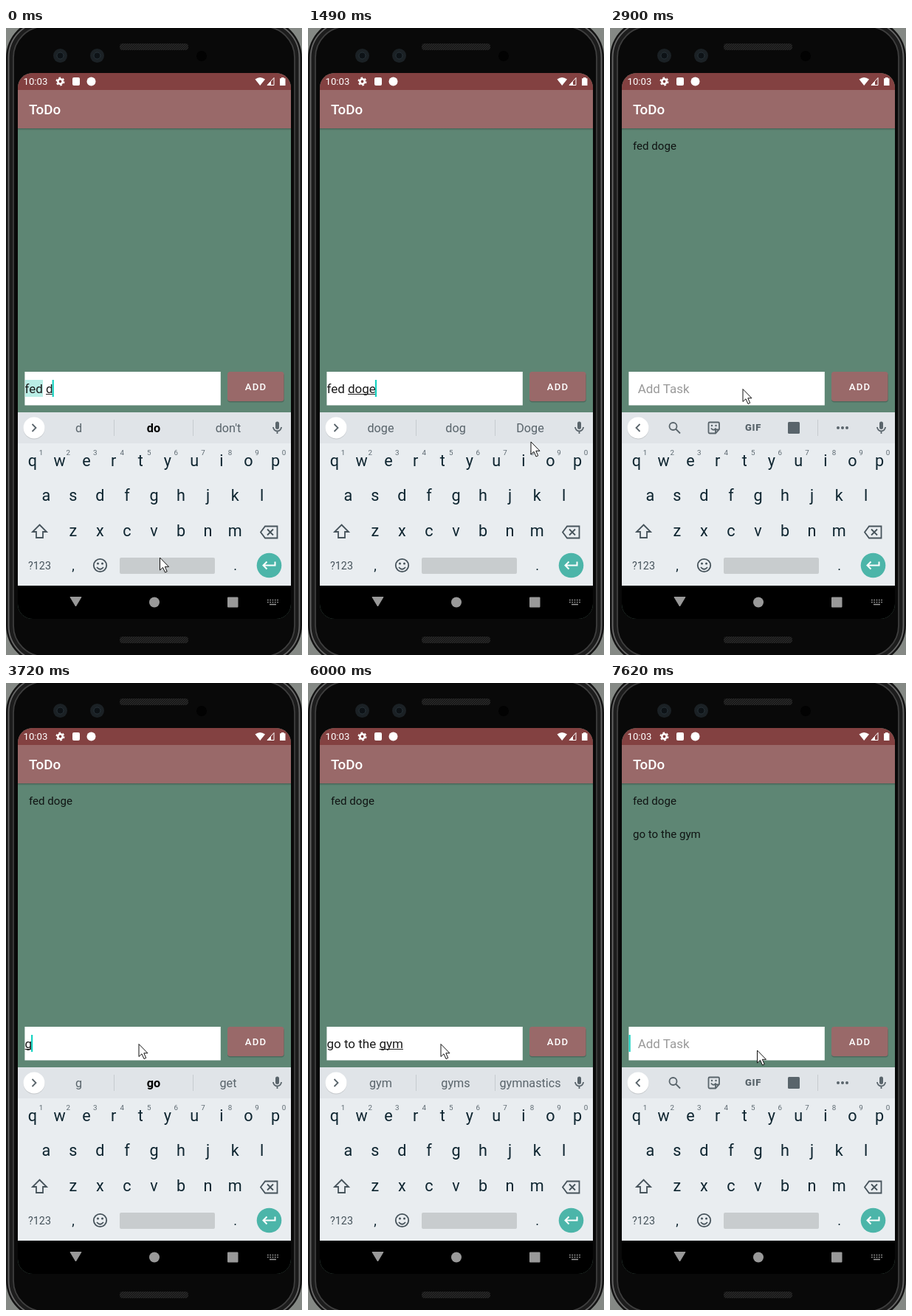
An HTML page that plays this animation: 401 px wide and 850 px high, repeating every 8 s.

```html
<!DOCTYPE html>
<html lang="en">
<head>
<meta charset="utf-8">
<title>ToDo</title>
<style>
html, body { margin: 0; width: 100%; height: 100%; overflow: hidden; background: #858985; }
svg { display: block; width: 100vw; height: 100vh; }
text { font-family: Roboto, sans-serif; white-space: pre; }
.mid { text-anchor: middle; }
.key { font-size: 21.6px; fill: #0e2530; }
.num { font-size: 9.8px; fill: #5c6870; }
.field { font-size: 17px; }
.item { font-size: 15.1px; fill: #101413; }
.hint { font-size: 16.2px; fill: #59646b; }
.line { fill: none; stroke: #59646b; stroke-width: 1.8; }
</style>
</head>
<body>
<svg viewBox="0 0 401 850">
  <defs>
    <clipPath id="screen"><rect x="16" y="61" width="370" height="740" rx="20"/></clipPath>
    <pattern id="mesh" width="3" height="3" patternUnits="userSpaceOnUse">
      <rect width="3" height="3" fill="#171717"/><path d="M0 3L3 0" stroke="#303030"/>
    </pattern>
    <linearGradient id="shade" x2="0" y2="1">
      <stop stop-color="#000" stop-opacity=".25"/><stop offset="1" stop-color="#000" stop-opacity="0"/>
    </linearGradient>
  </defs>

  <!-- phone body -->
  <rect x="0" y="-12" width="401" height="874" rx="52" fill="#141414"/>
  <rect x="3.500" y="-8.500" width="394" height="867" rx="48.500" fill="#1c1c1c" stroke="#666" stroke-width="1.800"/>
  <rect x="10" y="-2" width="381" height="854" rx="42" fill="#090909" stroke="#3e3e3e" stroke-width="1.800"/>
  <rect x="154" y="21" width="93" height="9" rx="4" fill="url(#mesh)"/>
  <rect x="154" y="825" width="93" height="9" rx="4" fill="url(#mesh)"/>
  <g fill="#1b2125"><circle cx="73.500" cy="37.500" r="9.500"/><circle cx="123.500" cy="37.500" r="9.500"/></g>
  <g fill="#0d1216" stroke="#28333a"><circle cx="73.500" cy="37.500" r="4.500"/><circle cx="123.500" cy="37.500" r="4.500"/></g>
  <circle cx="265" cy="38" r="7" fill="#020202"/>

  <g clip-path="url(#screen)">
    <rect x="16" y="61" width="370" height="740" fill="#5e8674"/>
    <rect x="16" y="61" width="370" height="23" fill="#834141"/>
    <rect x="16" y="84" width="370" height="52" fill="#996969"/>
    <rect x="16" y="136" width="370" height="3" fill="url(#shade)"/>
    <g fill="#fff">
      <text x="23.500" y="77" font-size="13.200">10:03</text>
      <text x="31" y="117" font-size="18.800" font-weight="500">ToDo</text>
      <circle cx="73.500" cy="72.500" r="3.200" fill="none" stroke="#fff" stroke-width="2.600"/>
      <circle cx="73.500" cy="72.500" r="5.200" fill="none" stroke="#fff" stroke-width="1.600" stroke-dasharray="2.700 2.745"/>
      <rect x="90" y="67" width="10" height="11" rx="2"/>
      <circle cx="115.500" cy="72.500" r="6"/>
      <path d="M337.500 69.500Q344 64.500 351 69.500L344.200 78Z"/>
      <path d="M363 67.500V77.500H354Z" fill="none" stroke="#fff"/>
      <path d="M359 72V77.500H354Z"/>
      <path d="M371 68.200h2V67h3.500v1.200h2V78h-7.500z"/>
    </g>
    <text id="item1" class="item" x="31" y="165">fed doge</text>
    <text id="item2" class="item" x="31" y="210">go to the gym</text>

    <!-- input row -->
    <rect x="25.400" y="466" width="265.400" height="45.500" fill="#fff"/>
    <rect id="mark" x="26" y="477" width="24" height="23" fill="#b9eee6"/>
    <text id="typed" class="field" x="25.500" y="495" fill="#1b1b1b"></text>
    <text id="empty" class="field" x="37.700" y="495" fill="#999">Add Task</text>
    <rect id="under" y="496" height="1" fill="#222"/>
    <rect id="caret" y="477" width="2.200" height="23" fill="#15d3c1"/>
    <rect x="300" y="467.500" width="77" height="40" rx="4" fill="#000" opacity=".2"/>
    <rect id="button" x="300" y="466" width="76.500" height="40" rx="3.500"/>
    <text x="323.700" y="491" font-size="13.200" font-weight="500" letter-spacing="1.180" fill="#fff">ADD</text>

    <!-- keyboard -->
    <rect x="16" y="521" width="370" height="235" fill="#e9edf0"/>
    <rect x="16" y="521" width="370" height="42" fill="#e0e4e8"/>
    <circle cx="38" cy="543" r="14.500" fill="#000" opacity=".12"/>
    <circle cx="38" cy="542" r="14.500" fill="#fff"/>
    <path id="chevron" class="line"/>
    <g id="words">
      <path d="M146.500 531V553M253.500 531V553" stroke="#c6cbcf"/>
      <text class="hint mid" x="98.500" y="548"></text>
      <text class="hint mid" x="200" y="548"></text>
      <text class="hint mid" x="301" y="548"></text>
    </g>
    <g id="tools" fill="#59646b">
      <circle cx="85.500" cy="540" r="5" class="line"/>
      <path d="M89 543.500L95 549.500" class="line"/>
      <path d="M135 534.500H146.500Q148 534.500 148 536V544L143 549.500H135Q133.500 549.500 133.500 548V536Q133.500 534.500 135 534.500ZM143 549V544.500H148M137 542.500Q140 547 143.500 542.500" class="line"/>
      <circle cx="138" cy="539" r="1.200"/><circle cx="143.500" cy="539" r="1.200"/>
      <text class="mid" x="194" y="546" font-size="13" font-weight="900" letter-spacing=".7">GIF</text>
      <rect x="241" y="534" width="16" height="16" rx="1.500"/>
      <path d="M281.500 531V553" stroke="#c6cbcf"/>
      <circle cx="309" cy="542" r="2"/><circle cx="315" cy="542" r="2"/><circle cx="321" cy="542" r="2"/>
    </g>
    <rect x="365" y="533.500" width="5" height="10.500" rx="2.500" fill="#59646b"/>
    <path d="M362 541a5.500 5.500 0 0 0 11 0M367.500 546.500V550" class="line"/>
    <g id="keys"></g>
    <g class="line" style="stroke: #46535b">
      <path d="M45.500 673.500L55 683H50V691H41V683H36Z"/>
      <path d="M351 675.500H367.500V691.500H351L345 683.500ZM354 679.500L362 687.500M362 679.500L354 687.500"/>
      <circle cx="127.500" cy="728.500" r="8.700"/>
      <path d="M123 731Q127.500 736.500 132 731"/>
    </g>
    <g fill="#46535b"><circle cx="124.500" cy="726" r="1.500"/><circle cx="130.500" cy="726" r="1.500"/></g>
    <text class="mid" x="45.500" y="734" font-size="14.300" fill="#46535b">?123</text>
    <g font-size="18" fill="#0e2530">
      <text class="mid" x="91" y="735">,</text>
      <text class="mid" x="310.500" y="735">.</text>
    </g>
    <rect x="154" y="718" width="129" height="22" rx="2" fill="#c8ccce"/>
    <circle cx="356.500" cy="728.500" r="16.800" fill="#4cb5a9"/>
    <path d="M364.500 723.500V728.500H349M353.500 723.500L348.500 728.500L353.500 733.500" fill="none" stroke="#fff" stroke-width="2"/>

    <!-- navigation bar -->
    <rect x="16" y="756" width="370" height="45"/>
    <g fill="#999">
      <path d="M87 771.500H102L94.500 784Z" stroke="#999" stroke-linejoin="round"/>
      <circle cx="201" cy="778.500" r="7"/>
      <rect x="300" y="771.500" width="14.500" height="14" rx="1"/>
      <path d="M354 775.500H369M354 778.500H369" stroke="#999" stroke-width="1.500" stroke-dasharray="1.700 1.600"/>
      <path d="M357 781.500H366" stroke="#999" stroke-width="1.500"/>
    </g>
  </g>
  <path id="mouse" d="M0 0V17L4 13.300L7 20L9.700 18.800L6.800 12.300H12Z" fill="#fff" stroke="#111" stroke-linejoin="round"/>
</svg>
<script>
const $ = id => document.getElementById(id);
const LOOP = 8000, LEFT = 25.5;

// time, typed text, suggestions (* marks the bold one)
const typing = [
  [0, 'fed d', 'd,*do,don\'t'],
  [150, 'fed do', 'do,does,doing'],
  [270, 'fed dog', 'dog,does,dogs'],
  [540, 'fed doge', 'doge,dog,Doge'],
  [2120, ''],
  [3600, 'g', 'g,*go,get'],
  [3840, 'go', 'go,going,good'],
  [3960, 'go ', 'to,back,and'],
  [4110, 'go t', 't,*to,the'],
  [4230, 'go to', 'to,too,tomorrow'],
  [4350, 'go to t', 't,*the,to'],
  [4470, 'go to th', 'th,*the,that'],
  [4620, 'go to the', 'the,they,then'],
  [4770, 'go to the ', 'gym,store,grocery'],
  [5170, 'go to the g', 'g,*gym,grocery'],
  [5320, 'go to the gy', 'gy,*gym,grocery'],
  [5470, 'go to the gym', 'gym,gyms,gymnastics'],
  [6660, '']
];
// time, pointer x, y
const moves = [
  [0, 208.5, 718], [1130, 222, 696], [1250, 248, 652], [1370, 277, 603],
  [1490, 302, 561], [1610, 331, 524], [1730, 353, 497], [1880, 357, 492],
  [2390, 290, 500], [2510, 206, 505], [2660, 194, 499], [2780, 184, 492],
  [2900, 180, 489.5], [6120, 240, 487], [6240, 289, 486], [6390, 306, 486],
  [6540, 313, 488], [6810, 298, 491], [6930, 264, 494], [7050, 224, 497], [7170, 199.5, 498]
];
const caretOff = [[980, 1490], [1980, 2120], [2660, 3050], [5990, 6660], [7170, 7620]];
const pressed = [[1880, 2390], [6540, 6930]];

const at = (list, t) => list.findLast(e => e[0] <= t);
const within = (list, t) => list.some(([a, b]) => t >= a && t < b);
const show = (id, on) => $(id).style.display = on ? '' : 'none';

const pen = document.createElement('canvas').getContext('2d');
pen.font = '17px Roboto, sans-serif';
const width = s => pen.measureText(s).width;

let keys = '';
[['qwertyuiop', 36, 594], ['asdfghjkl', 54.3, 641], ['zxcvbnm', 90.8, 689]].forEach(([row, x, y], r) => {
  [...row].forEach((c, i) => {
    const kx = x + i * 36.55;
    keys += `<text class="key mid" x="${kx}" y="${y}">${c}</text>`;
    if (!r) keys += `<text class="num mid" x="${kx + 11.6}" y="579">${(i + 1) % 10}</text>`;
  });
});
$('keys').innerHTML = keys;
const slots = $('words').querySelectorAll('text');

function draw(now) {
  const t = now % LOOP;
  const [, text, words] = at(typing, t);
  const [, x, y] = at(moves, t);
  const start = text.lastIndexOf(' ') + 1;
  const from = width(text.slice(0, start)), end = width(text);

  $('typed').textContent = text;
  $('under').setAttribute('x', LEFT + from);
  $('under').setAttribute('width', end - from);
  $('caret').setAttribute('x', LEFT + Math.max(0, end - 1));
  $('mouse').setAttribute('transform', `translate(${x} ${y})`);
  $('button').setAttribute('fill', within(pressed, t) ? '#a67b7a' : '#996969');
  $('chevron').setAttribute('d', words ? 'M35.5 537L40.5 542L35.5 547' : 'M40.5 537L35.5 542L40.5 547');

  show('mark', t < 150);
  show('caret', !within(caretOff, t));
  show('empty', !text);
  show('words', words);
  show('tools', !words);
  show('item1', t >= 2120);
  show('item2', t >= 6660);

  if (words) words.split(',').forEach((w, i) => {
    const bold = w[0] === '*';
    slots[i].textContent = bold ? w.slice(1) : w;
    slots[i].style.fontWeight = bold ? 700 : 400;
    slots[i].style.fill = bold ? '#000' : '';
  });
}

const begin = performance.now();
function tick() {
  draw(performance.now() - begin);
  requestAnimationFrame(tick);
}
tick();
</script>
</body>
</html>
```
